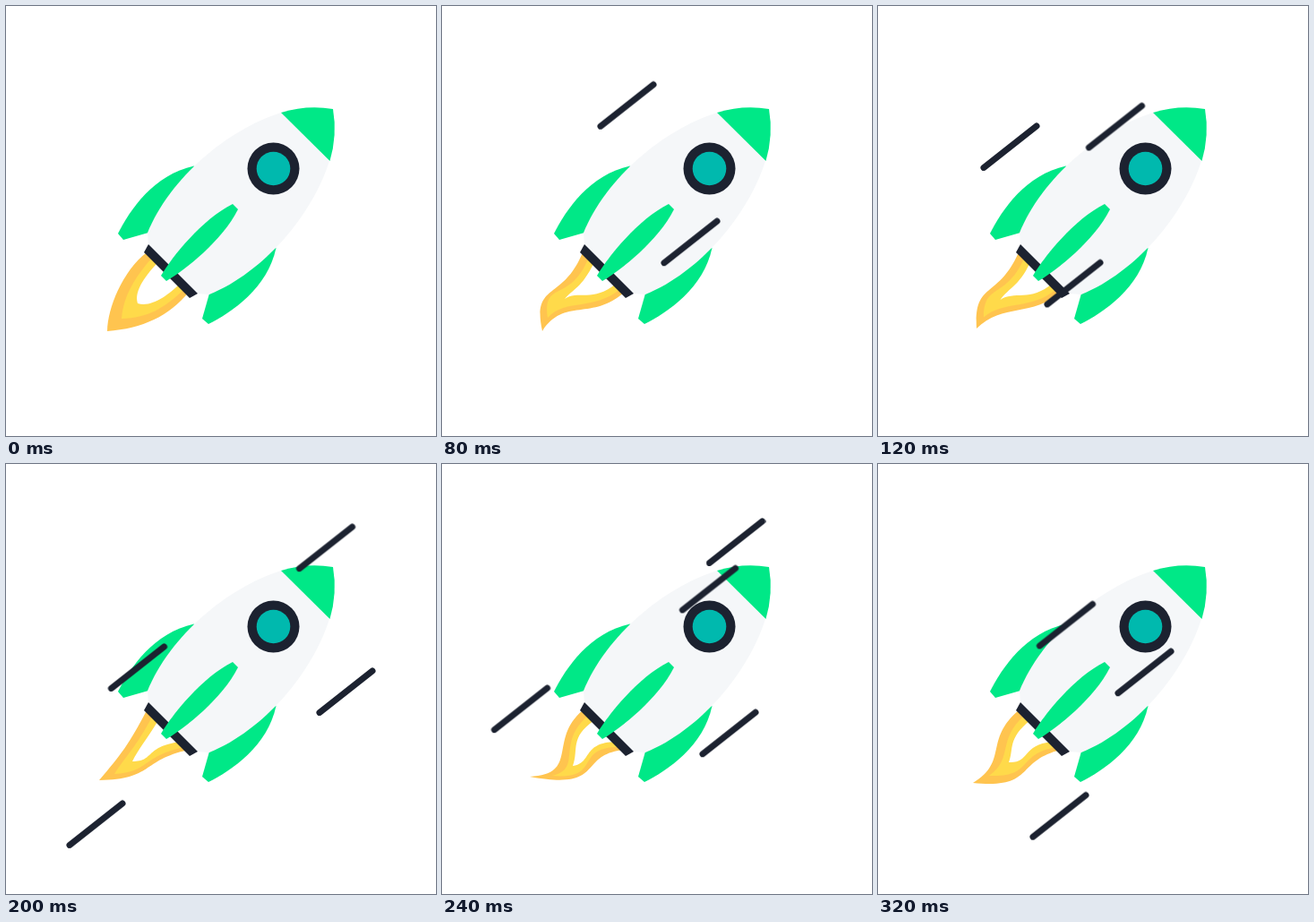
Write an HTML page without scripts that moves like this. It is 480 by 480 pixels and loops after 360 ms.

```html
<!DOCTYPE html>
<html lang="en">
<head>
<meta charset="utf-8">
<title>Rocket</title>
<style>
  html, body { margin: 0; width: 100%; height: 100%; overflow: hidden; background: #fff; }
  svg { display: block; width: 100%; height: 100%; }

  .green { fill: #00e887; }
  .dark { fill: #1c2230; }

  /* Flame: steps(2) holds a halfway pose between two drawn ones */
  .flame path { animation: 360ms infinite; }
  .flame .outer { fill: #ffc44f; animation-name: outer; }
  .flame .mid { fill: #ffda4a; animation-name: mid; }
  .flame .core { fill: #fff; animation-name: core; }

  @keyframes outer {
    0% { d: path("M157 275C130 296 113 338 113 363C152 360 183 346 204 319"); animation-timing-function: steps(2); }
    22.2222% { d: path("M157 275C135 330 100 308 112 363C136 325 168 352 204 319"); animation-timing-function: steps(2); }
    44.4444% { d: path("M157 275C132 326 114 306 108 357C142 338 178 343 204 319"); animation-timing-function: step-end; }
    55.5556% { d: path("M157 275C138 312 128 325 104 353C165 352 150 331 204 319"); animation-timing-function: step-end; }
    66.6667% { d: path("M157 275C118 308 154 346 98 349C184 365 150 324 204 319"); animation-timing-function: steps(2); }
    88.8889%, 100% { d: path("M157 275C118 308 146 332 106 356C176 363 152 332 204 319"); animation-timing-function: step-end; }
  }
  @keyframes mid {
    0% { d: path("M164 280C146 300 131 322 129 349C158 348 176 338 199 316"); animation-timing-function: steps(2); }
    22.2222% { d: path("M164 280C143 333 112 305 118 348C138 326 168 341 199 316"); animation-timing-function: steps(2); }
    44.4444% { d: path("M164 280C142 324 124 312 118 347C142 330 174 339 199 316"); animation-timing-function: step-end; }
    55.5556% { d: path("M164 280C148 312 136 323 121 346C160 344 152 326 199 316"); animation-timing-function: step-end; }
    66.6667% { d: path("M164 280C126 312 158 340 123 348C180 353 146 315 199 316"); animation-timing-function: steps(2); }
    88.8889%, 100% { d: path("M164 280C132 308 152 328 124 348C174 350 154 324 199 316"); animation-timing-function: step-end; }
  }
  @keyframes core {
    0% { d: path("M170 286C158 298 142 318 147 332C162 337 182 322 194 310"); animation-timing-function: steps(2); }
    22.2222% { d: path("M170 286C156 315 146 316 137 327C150 317 170 331 194 310"); animation-timing-function: steps(2); }
    44.4444% { d: path("M170 286C158 312 147 312 136 329C152 318 172 330 194 310"); animation-timing-function: step-end; }
    55.5556% { d: path("M170 286C158 306 148 318 141 332C166 332 154 316 194 310"); animation-timing-function: step-end; }
    66.6667% { d: path("M170 286C142 306 153 318 146 337C168 334 156 311 194 310"); animation-timing-function: steps(2); }
    88.8889%, 100% { d: path("M170 286C144 307 152 318 146 333C170 334 160 314 194 310"); animation-timing-function: step-end; }
  }

  /* Streaks: --at is the start, --life the keyframes for how many steps it shows */
  .streaks { fill: none; stroke: #1c2230; stroke-width: 7; stroke-linecap: round; }
  .streaks use {
    visibility: hidden;
    animation: fly 360ms steps(9) infinite, var(--life, show4) 360ms step-end infinite;
    animation-delay: calc(var(--at) - 360ms);
  }
  @keyframes fly { to { transform: translate(-531px, 416px); } }
  @keyframes show2 { 0% { visibility: visible; } 22.2222%, 100% { visibility: hidden; } }
  @keyframes show3 { 0% { visibility: visible; } 33.3333%, 100% { visibility: hidden; } }
  @keyframes show4 { 0% { visibility: visible; } 44.4444%, 100% { visibility: hidden; } }
  @keyframes show5 { 0% { visibility: visible; } 55.5556%, 100% { visibility: hidden; } }
</style>
</head>
<body>
<svg viewBox="0 0 480 480">
  <defs>
    <path id="streak" d="M0 0L-59 46.5"/>
    <path id="fin" d="M210 178.500C165 188 138 228 125 254L131 261L159 253L215 200Z"/>
  </defs>

  <g class="flame">
    <path class="outer" d="M157 275C130 296 113 338 113 363C152 360 183 346 204 319"/>
    <path class="mid" d="M164 280C146 300 131 322 129 349C158 348 176 338 199 316"/>
    <path class="core" d="M170 286C158 298 142 318 147 332C162 337 182 322 194 310"/>
  </g>

  <!-- The rocket mirrors across the line x + y = 480 -->
  <g class="green">
    <use href="#fin"/>
    <use href="#fin" transform="matrix(0 -1 -1 0 480 480)"/>
  </g>
  <path fill="#f5f7f9" d="M307 119C247 138 183 192 158 253L159 267L213 321L227 322C288 297 342 233 361 173Z"/>
  <path class="green" d="M307 119Q336 110 365 115Q370 144 361.500 173Z"/>
  <circle class="dark" cx="298.500" cy="181.500" r="29"/>
  <circle fill="#00b9ae" cx="298.500" cy="181.500" r="18.800"/>
  <path class="dark" d="M159 266L214 321L205 326L154 275Z"/>
  <path class="green" d="M253 221C219 238 186 279 173 301L179 307C201 294 242 261 259 227Z"/>

  <g class="streaks">
    <use href="#streak" x="295" y="41.500" style="--at: 40ms"/>
    <use href="#streak" x="366" y="194" style="--at: 40ms; --life: show5"/>
    <use href="#streak" x="294.500" y="111.500" style="--at: 120ms"/>
    <use href="#streak" x="445.500" y="24" style="--at: 160ms"/>
    <use href="#streak" x="409" y="231" style="--at: 200ms"/>
    <use href="#streak" x="357.500" y="64" style="--at: 240ms; --life: show3"/>
    <use href="#streak" x="386" y="163" style="--at: 280ms; --life: show2"/>
  </g>
</svg>
</body>
</html>
```
